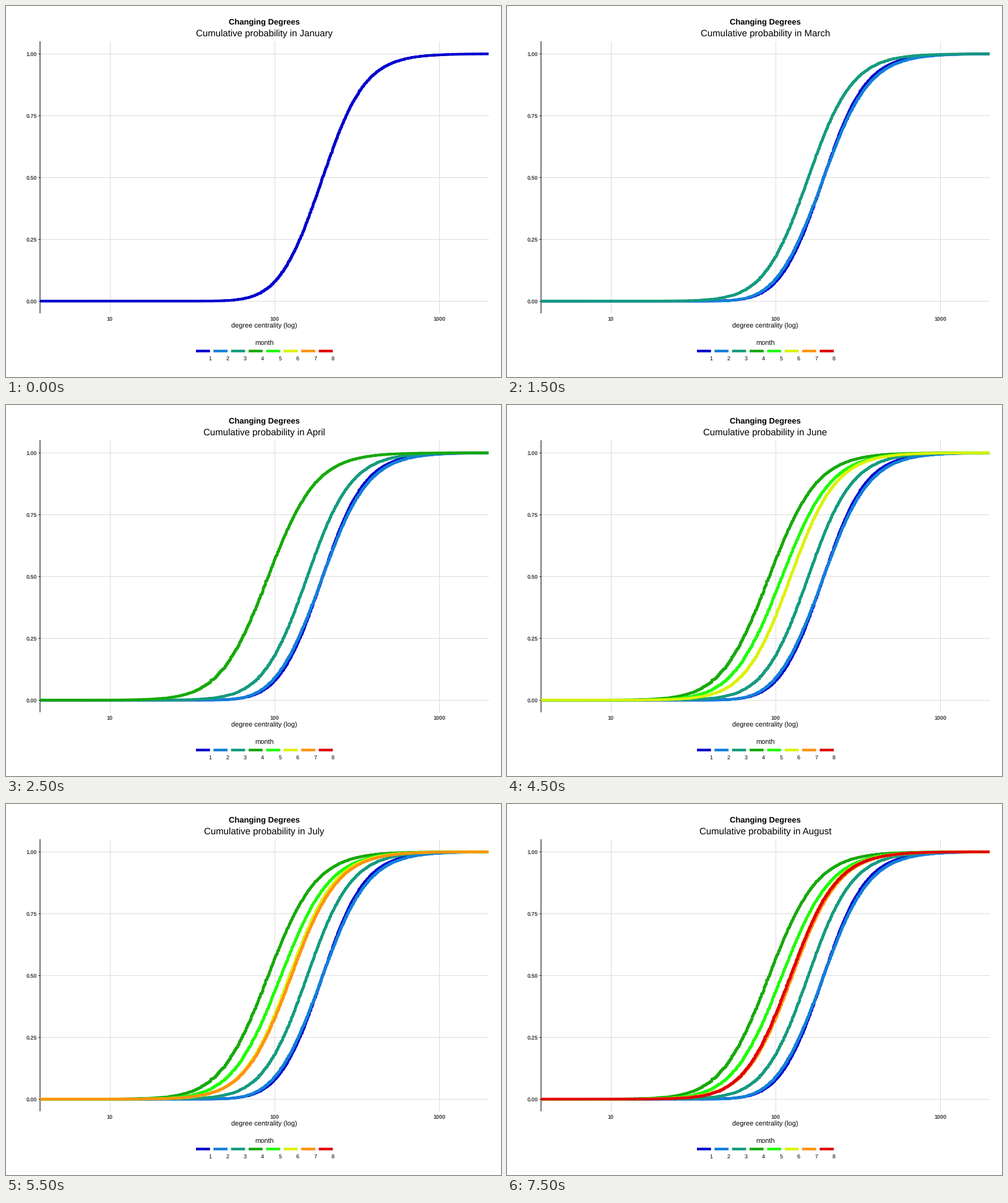
Animation of 800 by 600 pixels, one loop 8 s. Source, as a matplotlib script:

```python
import math
import numpy as np
import matplotlib.pyplot as plt
from matplotlib.animation import FuncAnimation

W, H, DPI = 800, 600, 100
PT = 72 / DPI                      # points per pixel
LEFT, RIGHT, TOP, BOTTOM = 55, 780, 57, 497
Y_ZERO, Y_SPAN = 477.3, 400
X_TEN, DECADE = 167.9, 266.3
STEP_MS = 500
CURVE_WIDTH = 4.27
RIGHT_TAIL = 2.6

plt.rcParams["font.family"] = "Liberation Sans"
plt.rcParams["text.hinting"] = "no_hinting"

# name, colour, median degree, spread in pixels, left tail
MONTHS = [
    ("January", "#0000cd", 196, 55, 0),
    ("February", "#1480d9", 196, 59, -0.6),
    ("March", "#159b7e", 158, 57, 1.2),
    ("April", "#16a90a", 91.5, 62, 1.3),
    ("May", "#20fb08", 109.5, 63, 0.9),
    ("June", "#dcf20a", 123.5, 59, 1.4),
    ("July", "#ff9410", 126.5, 60, 1.6),
    ("August", "#e0000a", 123.5, 60, 0.9),
]


def x_pos(degree):
    return X_TEN + DECADE * (np.log10(degree) - 1)


def y_pos(prob):
    return Y_ZERO - Y_SPAN * prob


def staircase(median, spread, left_tail, rng):
    """Log-normal cumulative curve with stretched tails, in whole-degree steps."""
    z = np.linspace(-4, 4, 400)
    tail = np.where(z < 0, left_tail, RIGHT_TAIL)
    xs = x_pos(median) + spread * z + tail * z ** 3
    ps = [0.5 * (1 + math.erf(v / math.sqrt(2))) for v in z]

    degree = np.arange(3, 2100)
    p = np.interp(x_pos(degree + 0.5), xs, ps, left=0, right=1)
    p += 0.004 * np.sqrt(p * (1 - p)) * rng.standard_normal(len(p))
    return x_pos(degree), y_pos(np.maximum.accumulate(p))


fig = plt.figure(figsize=(W / DPI, H / DPI), dpi=DPI, facecolor="white")
ax = fig.add_axes([0, 0, 1, 1])
ax.set_xlim(0, W)
ax.set_ylim(H, 0)
ax.axis("off")

# The curves live in their own axes so that the panel clips them.
panel = fig.add_axes([LEFT / W, 1 - BOTTOM / H,
                      (RIGHT - LEFT) / W, (BOTTOM - TOP) / H])
panel.set_xlim(LEFT, RIGHT)
panel.set_ylim(BOTTOM, TOP)
panel.axis("off")


def line(xs, ys, color, width, where=ax, **kw):
    return where.plot(xs, ys, color=color, lw=width * PT,
                      solid_capstyle="butt", **kw)[0]


def label(x, y, text, size, color="black", ha="center", **kw):
    return ax.text(x, y, text, fontsize=size * PT, color=color,
                   ha=ha, va="baseline", **kw)


# Grid and axis
GRID, DARK = "#dcdcdc", "#404040"
for prob in np.linspace(0, 1, 5):
    y = y_pos(prob)
    line([LEFT, RIGHT], [y, y], GRID, 1)
    line([LEFT - 3, LEFT], [y, y], "#333333", 1)
    label(50, y + 3.2, f"{prob:.2f}", 9, DARK, "right", weight="bold")
for degree in (10, 100, 1000):
    x = x_pos(degree)
    line([x - 0.2, x - 0.2], [TOP, BOTTOM], GRID, 1)
    label(x, 509.2, str(degree), 9, DARK, weight="bold")
line([LEFT, LEFT], [TOP, BOTTOM], "black", 1.07, snap=False)

# Titles
label(417.5, 30.2, "Changing Degrees", 13)
ax.texts[-1].set_weight("bold")
subtitle = label(417.5, 49.2, "", 15)
label(417.5, 521.2, "degree centrality (log)", 11)

# Legend and curves
label(417.5, 549.2, "month", 11)
rng = np.random.default_rng(8)
curves = []
for i, (_, color, *shape) in enumerate(MONTHS):
    x = 307 + 28.35 * i
    line([x, x + 22.7], [558, 558], color, CURVE_WIDTH, snap=False)
    label(x + 22.6, 573.2, str(i + 1), 9)
    curves.append(line(*staircase(*shape, rng), color, CURVE_WIDTH, panel,
                       drawstyle="steps-post", solid_joinstyle="round",
                       snap=False))


def update(frame):
    month = min((frame + 1) // 2, len(MONTHS) - 1)
    subtitle.set_text(f"Cumulative probability in {MONTHS[month][0]}")
    for i, curve in enumerate(curves):
        curve.set_visible(i <= month)
    return [subtitle, *curves]


anim = FuncAnimation(fig, update, frames=16, interval=STEP_MS,
                     repeat=True, repeat_delay=0, blit=False)
plt.show()
```
